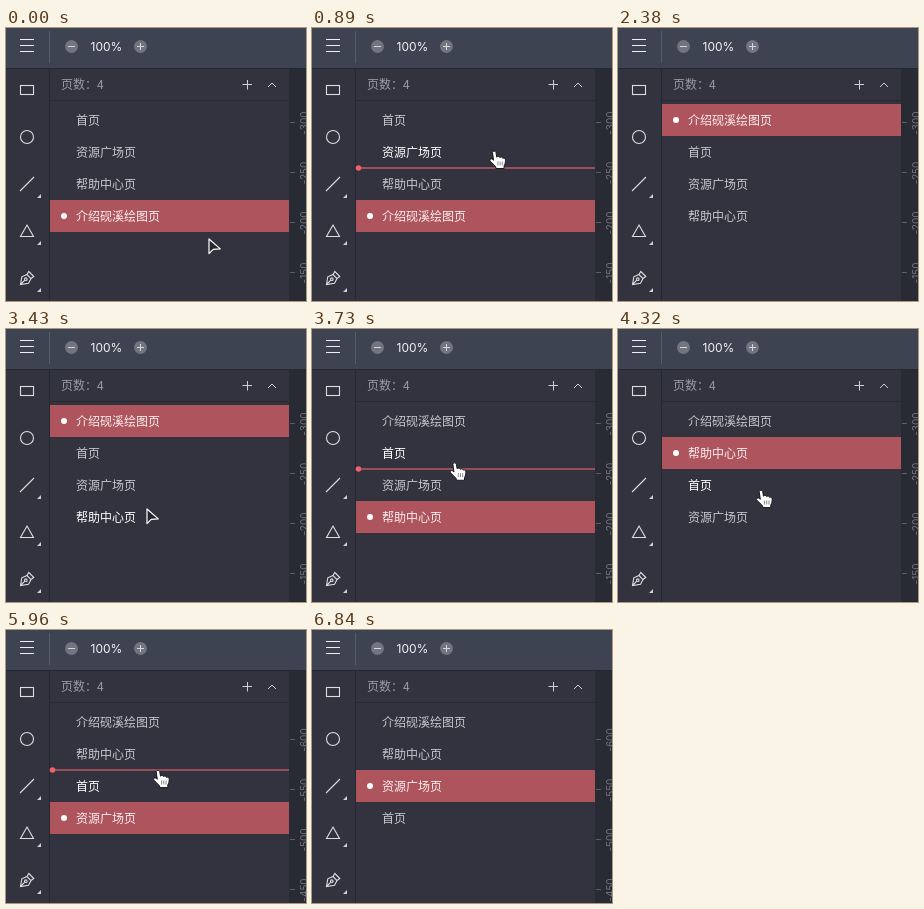
Recreate the animation shown at these times as an HTML page. Size 300 by 273 pixels, loop 8.13 s.

```html
<!DOCTYPE html>
<html lang="zh-CN">
<head>
<meta charset="utf-8">
<title>页面排序</title>
<style>
  html, body { margin: 0; width: 100%; height: 100%; overflow: hidden; background: #32333e; }
  svg { display: block; width: 100vw; height: 100vh; }
  text { font: 12px "Noto Sans CJK SC", "Noto Sans CJK", sans-serif; fill: #c8c9cf; }
  .zoom { font-family: Inter, sans-serif; fill: #f3f4f6; }
  .ruler text { font: 10px Inter, sans-serif; fill: #74757f; text-anchor: middle; }
  .ruler path { stroke: #5b5d67; }
  .head { fill: #9a9ba5; }
  .tools { fill: none; stroke: #dcdde1; stroke-width: 1.1; }
  .corner { fill: #d0d1d6; }
  .row.hover text { fill: #fff; }
  .row.selected text { fill: #fbf0f1; }
  .row .band, .row .dot { visibility: hidden; }
  .row.selected .band, .row.selected .dot { visibility: visible; }
  .band { fill: #ad545d; }
  .dot { fill: #fff; }
</style>
</head>
<body>
<svg viewBox="0 0 300 273" preserveAspectRatio="none">
  <rect width="300" height="273" fill="#32333e"/>
  <rect x="283" y="40" width="17" height="233" fill="#282a34"/>
  <g class="ruler" id="ruler"></g>
  <rect width="300" height="40" fill="#3d4350"/>
  <path d="M0 40.5H300M43.5 41V273" stroke="#262831"/>
  <path d="M43.5 3V35" stroke="#565c69"/>
  <path d="M44 72.5H283" stroke="#272831"/>

  <path d="M14 11.5H28M14 17.5H28M14 23.5H28" stroke="#eceef0"/>
  <g fill="#70757f"><circle cx="65.5" cy="18.5" r="6.5"/><circle cx="134.5" cy="18.5" r="6.5"/></g>
  <path d="M62 18.5H69M131 18.5H138M134.5 15V22" stroke="#d3d6da"/>
  <text class="zoom" x="84.5" y="23">100%</text>

  <g class="tools">
    <rect x="14.5" y="57.5" width="13" height="9"/>
    <circle cx="21" cy="109" r="6.5"/>
    <path d="M14 163L28 149"/>
    <path d="M21 197L27.5 208.5H14.5Z"/>
    <path d="M14.5 256.5L15.8 248.8 21 246.5 25 250.5 22.5 255.2ZM14.5 256.5L18.8 252.2M21 246.5L22.8 243.5 27.8 248.5 25 250.5"/>
    <circle cx="19.8" cy="251.2" r="1.3"/>
  </g>
  <path class="corner" d="M35 166V170H31ZM35 213V217H31ZM35 260V264H31Z"/>

  <text class="head" x="55" y="61">页数：4</text>
  <path d="M236.5 56.5H246M241.5 52V61.5M262 59L266 55 270 59" fill="none" stroke="#cfd0d6"/>

  <g id="rows"></g>
  <g id="marker">
    <path d="M48 0H283" stroke="#bd5761" stroke-width="1.6"/>
    <circle cx="46.5" r="2.8" fill="#f0616b"/>
  </g>

  <path id="arrow" d="M1 1V15.6L5.2 11.4 12.3 10.9Z" fill="#27272e" stroke="#fff" stroke-width="1.2" stroke-linejoin="round"/>
  <g id="hand">
    <path d="M-1.8 1.6C-1.8 -.3 1.4 -.3 1.7 1.6L2.5 6.2C3.3 5 5.2 5.3 5.6 6.6 6.6 5.6 8.2 6.1 8.5 7.4 9.9 6.6 11.2 7.6 11.2 9.2 11.3 11.6 10.6 13.4 9.8 15V17.6H1.6V15.8C-.4 14.2 -1.8 12.2 -3.8 10.4 -5.4 8.8 -3.4 7.2 -1.9 8.3L-.7 9.3Z"
      fill="#fff" stroke="#16171c" stroke-linejoin="round"/>
    <path d="M3.6 10.5V14.5M5.8 10.5V14.5M8 10.5V14.5" stroke="#55565e" stroke-width=".7"/>
  </g>
</svg>
<script>
// The screen refreshes in even beats; all times below are counted in beats.
const LOOP = 8130, BEAT = 148.9, LEAD = 12;
const TOP = 76, ROW = 32, EDGE = 283;
const names = ['首页', '资源广场页', '帮助中心页', '介绍砚溪绘图页'];
const $ = id => document.getElementById(id);

// Each drag selects its page on grab and moves it to a slot on drop
const drags = [
  { page: 3, grab: 5, drop: 16, slot: 0 },
  { page: 2, grab: 24, drop: 29, slot: 1 },
  { page: 1, grab: 34, drop: 41, slot: 2 }
];

// The cursor rests between glides; ease is the power of the ease-out
const glide = (start, end, x, y, kind = 'hand', ease = 1) => ({ start, end, x, y, kind, ease });
const home = { x: 202, y: 210, kind: 'arrow' };
const path = [
  glide(0, 3, 193, 192),
  glide(4, 13, 175, 76, 'hand', 3.6),
  glide(15, 16, 150, 300),
  glide(17, 18, 150, 200, 'arrow'),
  glide(18, 23, 140, 179, 'arrow'),
  glide(23, 26, 144, 111),
  glide(28, 29, 143, 161),
  glide(29, 32, 151, 183),
  glide(34, 36, 152, 146),
  glide(39, 40, 152, 140),
  glide(40, 41, 272, 160),
  glide(43, 46, 302, 262, 'arrow')
];

const show = (el, on) => el.setAttribute('visibility', on ? 'visible' : 'hidden');
const place = (el, x, y) => el.setAttribute('transform', `translate(${x} ${y})`);

$('rows').innerHTML = names.map(n => `<g class="row">
  <rect class="band" x="44" width="239" height="32"/>
  <circle class="dot" cx="58" cy="16" r="3"/>
  <text x="70" y="20.5">${n}</text></g>`).join('');
const rows = [...$('rows').children];

function drawRuler(first, y0) {
  $('ruler').innerHTML = [0, 1, 2, 3].map(i => {
    const y = y0 + i * 50;
    return `<path d="M284 ${y + .5}H289"/><text transform="translate(302 ${y + 1}) rotate(-90)">${first + i * 50}</text>`;
  }).join('');
}

function cursorAt(beat) {
  let at = home;
  for (const g of path) {
    if (beat <= g.start) break;
    const p = 1 - (1 - Math.min(1, (beat - g.start) / (g.end - g.start))) ** g.ease;
    at = { x: at.x + (g.x - at.x) * p, y: at.y + (g.y - at.y) * p, kind: g.kind };
  }
  return at;
}

function listAt(beat) {
  let order = [0, 1, 2, 3], pick = 3, dragging = false;
  for (const { page, grab, drop, slot } of drags) {
    if (beat < grab) break;
    pick = page;
    dragging = beat < drop;
    if (dragging) break;
    order = order.filter(id => id !== page);
    order.splice(slot, 0, page);
  }
  return { order, pick, dragging };
}

function render(beat) {
  const c = cursorAt(beat);
  const { order, pick, dragging } = listAt(beat);
  const over = c.x < EDGE ? Math.floor((c.y - TOP) / ROW) : -1;

  rows.forEach((row, id) => {
    const slot = order.indexOf(id);
    place(row, 0, TOP + slot * ROW);
    row.classList.toggle('selected', id === pick);
    row.classList.toggle('hover', slot === over);
  });
  show($('marker'), dragging);
  place($('marker'), 0, TOP + ROW * Math.round((c.y + 3 - TOP) / ROW));
  for (const kind of ['arrow', 'hand']) {
    show($(kind), c.kind === kind);
    place($(kind), c.x, c.y);
  }
  pick === 1 ? drawRuler(-600, 109) : drawRuler(-300, 94);
}

const begin = performance.now();
let shown = -1;
function tick() {
  const beat = Math.floor(((performance.now() - begin) % LOOP + LEAD) / BEAT);
  if (beat !== shown) render(shown = beat);
  requestAnimationFrame(tick);
}
tick();
</script>
</body>
</html>
```
